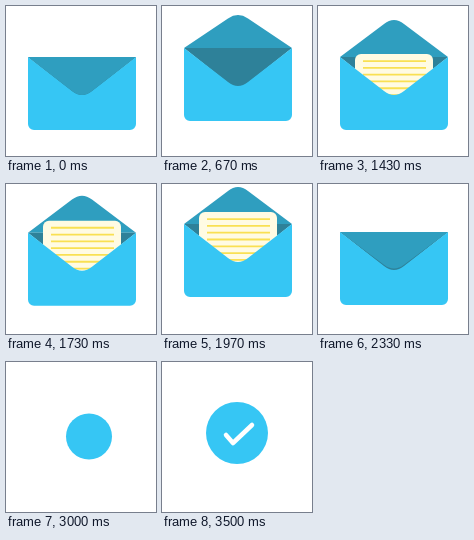
Recreate the animation shown at these times as an HTML page with a canvas. Size 150 by 150 pixels, loop 4010 ms.

```html
<!DOCTYPE html>
<html lang="en">
<head>
<meta charset="utf-8">
<title>Envelope</title>
<style>
html, body { margin: 0; height: 100%; overflow: hidden; background: #fff; }
canvas { display: block; width: 100vw; height: 100vh; }
</style>
</head>
<body>
<canvas id="stage" width="150" height="150"></canvas>
<script>
const ctx = document.getElementById('stage').getContext('2d');
const LOOP = 4010, LEFT = 22, TOP = 51, WIDTH = 108, HEIGHT = 73;
const BLUE = '#36c6f4', FLAP = '#2f9ebf', INSIDE = '#2e8199', PAPER = '#fffbe3', RULE = '#f9e052';

// Smooth interpolation through [time, value] keys without overshoot.
function track(...keys) {
  const slope = i => (keys[i + 1][1] - keys[i][1]) / (keys[i + 1][0] - keys[i][0]);
  const tangent = i => {
    if (i === 0 || i === keys.length - 1) return 0;
    const a = slope(i - 1), b = slope(i);
    return a * b > 0 ? 2 * a * b / (a + b) : 0;
  };
  return t => {
    if (t <= keys[0][0]) return keys[0][1];
    const i = keys.findIndex(k => k[0] > t) - 1;
    if (i < 0) return keys[keys.length - 1][1];
    const [t0, v0] = keys[i], [t1, v1] = keys[i + 1];
    const d = t1 - t0, u = (t - t0) / d, w = 1 - u;
    return v0 * w * w * (1 + 2 * u) + v1 * u * u * (3 - 2 * u)
      + d * u * w * (tangent(i) * w - tangent(i + 1) * u);
  };
}

const lift = track([30, 0], [480, -12], [560, -12], [670, -9], [760, -6], [1060, 0],
  [1630, 0], [1970, -11], [2170, -10], [2330, -3], [2500, 0]);
// Positive: folded down over the body, negative: standing open.
const flapTip = track([30, 38], [540, 0], [670, -33], [760, -41], [1100, -41], [1430, -37],
  [1970, -37], [2130, 0], [2330, 36.5], [2500, 38], [2690, 38], [2780, 0]);
const letterTop = track([1090, 90], [1430, 48], [1600, 39], [1970, 39], [2150, 90]);

const badge = {
  x: track([2690, 76], [2800, 83], [3000, 83], [3240, 76], [3480, 75]),
  y: track([2690, 87.5], [2800, 75], [3000, 74.5], [3240, 69], [3480, 71]),
  w: track([2690, 108], [2800, 103], [3000, 46], [3240, 66], [3480, 62]),
  h: track([2690, 73], [2800, 104], [3000, 46], [3240, 66], [3480, 62]),
  r: track([2690, 5], [2800, 52])
};
const tick = track([3200, 0], [3460, 1]);

function fill(color, trace) {
  ctx.beginPath();
  trace();
  ctx.fillStyle = color;
  ctx.fill();
}

// Edge from the left corner over the rounded tip to the right corner.
function flapEdge(tip) {
  ctx.moveTo(LEFT, TOP);
  ctx.lineTo(LEFT + 44, TOP + tip * 0.895);
  ctx.quadraticCurveTo(LEFT + 54, TOP + tip * 1.105, LEFT + 64, TOP + tip * 0.895);
  ctx.lineTo(LEFT + WIDTH, TOP);
}

function drawLetter(top) {
  fill(PAPER, () => ctx.roundRect(37, top, 78, 122 - top, [6, 6, 0, 0]));
  for (let y = top + 6.2; y < 120; y += 6.8) {
    fill(RULE, () => ctx.rect(45, y, 63, 1.8));
  }
}

function drawEnvelope(t) {
  const tip = flapTip(t);
  ctx.save();
  ctx.translate(0, lift(t));
  if (tip < 0) fill(FLAP, () => flapEdge(tip));
  fill(INSIDE, () => flapEdge(39));
  if (t > 1090 && t < 2150) drawLetter(letterTop(t));
  fill(BLUE, () => {
    flapEdge(38);
    ctx.arcTo(LEFT + WIDTH, TOP + HEIGHT, LEFT, TOP + HEIGHT, 6);
    ctx.arcTo(LEFT, TOP + HEIGHT, LEFT, TOP, 6);
  });
  if (tip > 0) fill(FLAP, () => flapEdge(tip));
  ctx.restore();
}

function drawBadge(t) {
  const [x, y, w, h, r] = ['x', 'y', 'w', 'h', 'r'].map(key => badge[key](t));
  ctx.save();
  fill(BLUE, () => ctx.roundRect(x - w / 2, y - h / 2, w, h, Math.min(r, w / 2, h / 2)));
  ctx.clip();
  const tip = flapTip(t);
  if (tip > 0) {
    ctx.translate(x - 76, y - h / 2 - TOP);
    fill(FLAP, () => flapEdge(tip));
  }
  ctx.restore();

  const drawn = tick(t);
  if (!drawn) return;
  const length = Math.hypot(7, 8) + Math.hypot(19, 18);
  ctx.save();
  ctx.translate(x - 75, y - 71);
  ctx.strokeStyle = '#fff';
  ctx.lineWidth = 4.5;
  ctx.lineCap = ctx.lineJoin = 'round';
  ctx.setLineDash([drawn * length, length * 2]);
  ctx.beginPath();
  ctx.moveTo(64, 73);
  ctx.lineTo(71, 81);
  ctx.lineTo(90, 63);
  ctx.stroke();
  ctx.restore();
}

const start = performance.now();
function frame() {
  const t = (performance.now() - start) % LOOP;
  ctx.fillStyle = '#fff';
  ctx.fillRect(0, 0, 150, 150);
  if (t < 2690) drawEnvelope(t);
  else drawBadge(t);
  requestAnimationFrame(frame);
}
frame();
</script>
</body>
</html>
```
